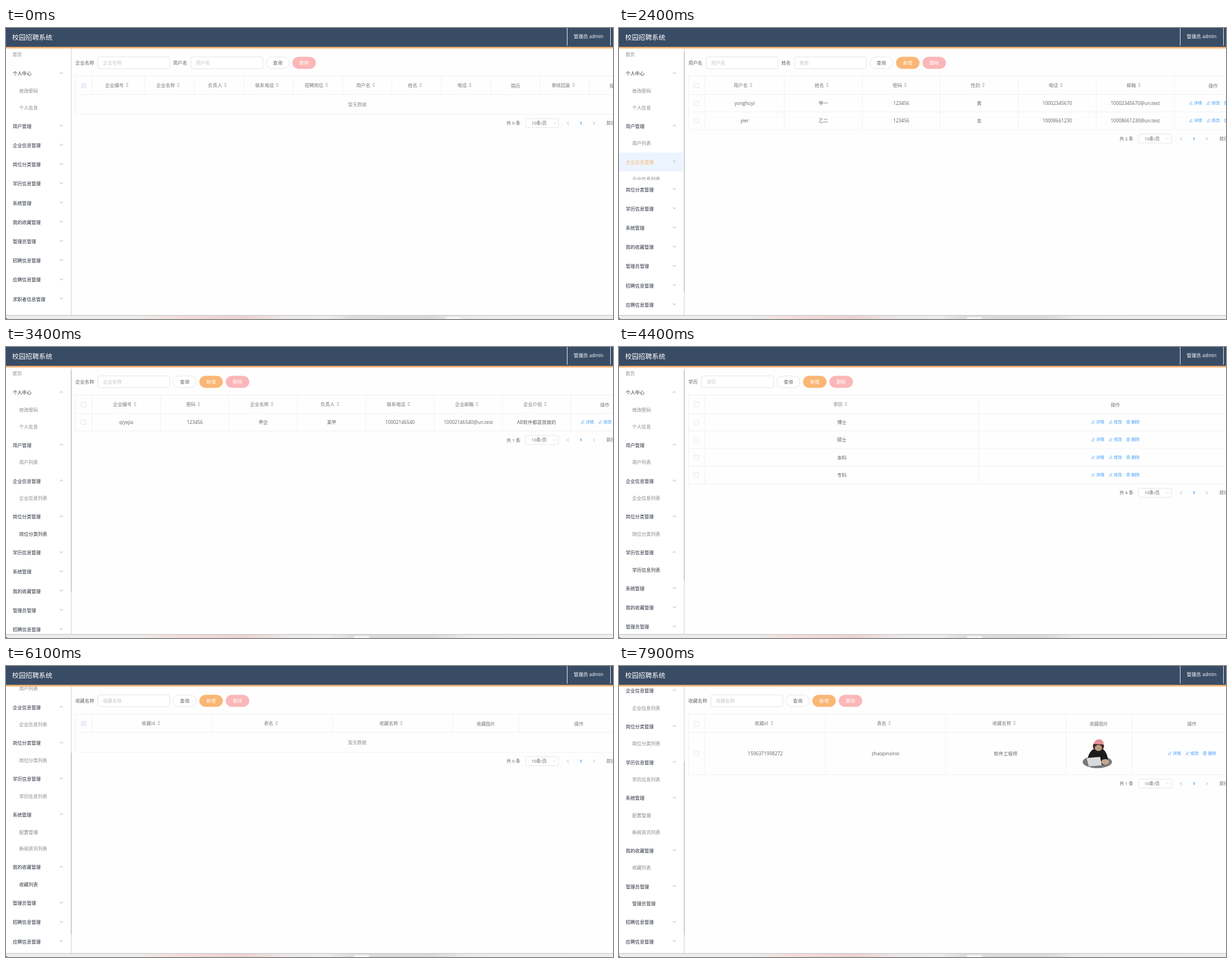
Write an HTML page that moves like this. It is 1080 by 518 pixels and loops after 8000 ms.

```html
<!DOCTYPE html>
<html lang="zh-CN">
<head>
<meta charset="utf-8">
<title>校园招聘系统</title>
<style>
html, body { margin: 0; width: 100%; height: 100%; overflow: hidden; background: #fff; }
svg { display: block; }
text { font-family: "Open Sans", "Noto Sans CJK SC", "Noto Sans CJK", sans-serif; white-space: pre; }
</style>
</head>
<body>
<svg id="stage" width="1080" height="518" viewBox="0 0 1080 518">
  <defs>
    <linearGradient id="strip">
      <stop offset="0" stop-color="#ececec"/>
      <stop offset=".22" stop-color="#ececea"/>
      <stop offset=".28" stop-color="#f3dedb"/>
      <stop offset=".39" stop-color="#ecd3d0"/>
      <stop offset=".46" stop-color="#ebe9e8"/>
      <stop offset=".53" stop-color="#ececec"/>
      <stop offset=".57" stop-color="#dcdcdc"/>
      <stop offset=".7" stop-color="#d9d9d9"/>
      <stop offset=".76" stop-color="#ebebeb"/>
      <stop offset="1" stop-color="#eeeeee"/>
    </linearGradient>
  </defs>
  <rect width="1080" height="518" fill="#fefefe"/>
  <g id="page"></g>
  <g id="menu"></g>
  <g id="frame"></g>
</svg>
<script>
const LOOP = 8000, STEP = 100, FONT = 8.3;
const LINE = '#ebeef5', EDGE = '#dcdfe6', PALE = '#c0c4cc', BLUE = '#409eff';
const ORANGE = '#fab674', PINK = '#fbb6b8';

// Drawing helpers: text is placed by its visual middle
const text = (x, y, s, fill = '#606266', anchor = 'start', size = FONT, weight = 400) =>
  `<text x="${x}" y="${(y + size * .37).toFixed(2)}" fill="${fill}" text-anchor="${anchor}" font-size="${size}" font-weight="${weight}">${s}</text>`;
const rect = (x, y, w, h, fill, stroke = 'none', r = 0) =>
  `<rect x="${x}" y="${y}" width="${w}" height="${h}" rx="${r}" fill="${fill}" stroke="${stroke}" stroke-width=".8"/>`;
const path = (d, stroke = 'none', fill = 'none', move = '', width = .8) =>
  `<path d="${d}" stroke="${stroke}" fill="${fill}" stroke-width="${width}" transform="${move}"/>`;
const hline = y => rect(123.5, y - .4, 1000, .8, LINE);
const vline = (x, y, h) => rect(x - .4, y, .8, h, LINE);
const chevron = (x, y, turn = 0, color = '#909399', k = 2.5) =>
  path(`M${-k} ${-k / 2}L0 ${k / 2}L${k} ${-k / 2}`, color, 'none', `translate(${x} ${y}) rotate(${turn})`);
const box = (y, fill = '#fff') => rect(134, y - 4, 8, 8, fill, EDGE, 1);

const person = '1000', mail = '@un.test';
const phones = [person + '2345670', person + '8661230', person + '2146540'];
const stamp = i => 1596287010430 + i * 1037;

// Pages: search labels, inner column edges, headings (* = not sortable), rows
const pages = {
  apply: {
    form: ['企业名称', '用户名'],
    edges: [247, 335, 423, 511, 599, 686.5, 774.5, 862.5, 950.5, 1038],
    heads: ['企业编号', '企业名称', '负责人', '联系电话', '招聘岗位', '用户名', '姓名', '电话', '简历*', '审核回复'],
    rows: [], fixed: true
  },
  user: {
    form: ['用户名', '姓名'],
    edges: [294, 433, 571.5, 710.5, 849, 988],
    heads: ['用户名', '姓名', '密码', '性别', '电话', '邮箱'],
    rows: [
      ['yonghuyi', '甲一', '123456', '男', phones[0], phones[0] + mail],
      ['yier', '乙二', '123456', '女', phones[1], phones[1] + mail]
    ]
  },
  firm: {
    form: ['企业名称'],
    edges: [275, 397, 518.5, 640, 762, 883, 1005],
    heads: ['企业编号', '密码', '企业名称', '负责人', '联系电话', '企业邮箱', '企业介绍'],
    rows: [['qiyejia', '123456', '甲企', '某甲', phones[2], phones[2] + mail, 'AB软件都是我做的']]
  },
  job: {
    form: ['岗位名称'], edges: [640], heads: ['岗位名称'],
    rows: [['软件开发'], ['产品设计'], ['市场运营']]
  },
  degree: {
    form: ['学历'], edges: [640], heads: ['学历'],
    rows: [['博士'], ['硕士'], ['本科'], ['专科']]
  },
  config: {
    form: [], top: 45.5, right: 1190,
    edges: [428, 733, 1035], heads: ['ID', '名称', '值'],
    rows: [1, 2, 3, 4, 5, 6].map(i =>
      [i, i < 6 ? 'picture' + i : 'homepage', `http://files.test/campus/upload/${stamp(i)}.jpg`])
  },
  saved: {
    form: ['收藏名称'],
    edges: [367.5, 581, 795, 912.5],
    heads: ['收藏id', '表名', '收藏名称', '收藏图片*'],
    rows: [['1596371998272', 'zhaopinxinxi', '软件工程师', null]], rowH: 75
  }
};

// When each page shows; "empty" is the moment before its data arrive
const visits = [
  [0, 'apply'], [1900, 'user', 'empty'], [2000, 'user'], [2800, 'firm', 'empty'], [2900, 'firm'],
  [3600, 'job', 'empty'], [3700, 'job'], [4400, 'degree'], [5500, 'config', 'empty'],
  [5600, 'config'], [6100, 'saved', 'empty'], [6200, 'saved']
];

// Menu: title, time it starts to open, entries
const items = [
  ['首页'],
  ['个人中心', -1000, '修改密码', '个人信息'],
  ['用户管理', 1250, '用户列表'],
  ['企业信息管理', 2250, '企业信息列表'],
  ['岗位分类管理', 3000, '岗位分类列表'],
  ['学历信息管理', 3850, '学历信息列表'],
  ['系统管理', 4950, '配置管理', '新闻资讯列表'],
  ['我的收藏管理', 5750, '收藏列表'],
  ['管理员管理', 7600, '管理员管理'],
  ['招聘信息管理', LOOP], ['应聘信息管理', LOOP], ['求职者信息管理', LOOP]
];

// Pointer: time, item or item.entry, lit background
const hovers = [
  [0, ''], [300, '1.0'], [700, ''], [800, '1.1'], [1000, ''], [1200, '2'], [1500, ''], [1600, '2.0'],
  [2100, '3'], [2300, '3', 1], [2600, ''], [2700, '3.0'], [3000, '4', 1], [3300, '4.0'],
  [3800, '5', 1], [4000, '5'], [4200, '5.0'], [4500, ''], [4900, '6', 1], [5200, ''], [5300, '6.0'],
  [5800, '7'], [6000, '7.0'], [6400, '10', 1], [6600, ''], [6900, '7.0'], [7100, ''],
  [7500, '8', 1], [7700, '8'], [7900, '8.0']
];

// Menu scrolling: start, end, distance
const scrolls = [[4450, 4800, 106], [5600, 5850, 59], [7050, 7350, 29.6]];

const latest = (list, t) => list.filter(e => e[0] <= t).pop();
const ease = (t, from, to) => {
  const p = Math.min(1, Math.max(0, (t - from) / (to - from)));
  return p * p * (3 - 2 * p);
};

function searchForm(labels, noAdd) {
  let x = 123.5, out = '';
  for (const s of labels) {
    out += text(x, 62, s);
    x += s.length * FONT + 6.8;
    out += rect(x, 51.5, 128, 21, '#fff', EDGE, 2.4) + text(x + 9, 62, s, PALE);
    x += 133.8;
  }
  const buttons = [['查询', '#fff', '#606266', EDGE], ['新增', ORANGE, '#fff'], ['删除', PINK, '#fff']];
  for (const [s, fill, ink, edge] of buttons) {
    if (noAdd && s === '新增') continue;
    out += rect(x, 51.7, 41.2, 20.6, fill, edge || fill, 10.3) + text(x + 20.6, 62, s, ink, 'middle', FONT, 500);
    x += 47;
  }
  return out;
}

function heading(cx, top, label) {
  const s = label.replace('*', '');
  if (s !== label) return text(cx, top + 17, s, '#74777d', 'middle', FONT, 500);
  const w = [...s].reduce((sum, c) => sum + (c < '~' ? 4.6 : FONT), 0);
  return text(cx - 7, top + 16, s, '#74777d', 'middle', FONT, 500) +
    path('M-2.8 -1L0 -4L2.8 -1ZM-2.8 1L0 4L2.8 1Z', 'none', PALE, `translate(${cx - 1 + w / 2} ${top + 16})`);
}

function actions(cx, y) {
  const pen = 'M1 2.8L1.5 .8L4.4 -2.6L5.8 -1.4L3 2L1 2.8M3.8 3H6.4';
  const bin = 'M.4 -2H6M2.2 -2V-3H4.2V-2M1.1 -2V3H5.3V-2M2.5 -.6V1.6M3.9 -.6V1.6';
  return ['详情', '修改', '删除'].map((s, i) => {
    const x = cx - 43 + i * 31.4;
    return path(i < 2 ? pen : bin, BLUE, 'none', `translate(${x} ${y})`, .65) + text(x + 9, y, s, BLUE, 'start', 7.3);
  }).join('');
}

const picture = y =>
  `<g transform="translate(851 ${y})">
    <ellipse cy="15" rx="26" ry="11" fill="#77777a"/>
    <path d="M-17 8Q-13 -7 -3 -9H9Q18 -2 19 12L12 20H-10Z" fill="#1d1b1d"/>
    <ellipse cx="2" cy="-13" rx="10" ry="8" fill="#3a2a24"/>
    <ellipse cx="2" cy="-10" rx="6.5" ry="5.5" fill="#b99a83"/>
    <path d="M-7 -17Q-3 -27 6 -25Q12 -22 11 -16Z" fill="#e58f97"/>
    <path d="M-19 8L5 6L8 21L-15 23Z" fill="#d9dadc"/>
    <ellipse cx="14" cy="15" rx="7" ry="5" fill="#c3a68c"/>
  </g>`;

function pager(y, count) {
  return text(915, y, `共 ${count} 条`, '#606266', 'end', 7.9) +
    rect(924.5, y - 8, 58.5, 16, '#fff', EDGE, 1.8) +
    text(948.5, y, '10条/页', '#606266', 'middle', 7.7) + chevron(976, y, 0, PALE, 2) +
    chevron(1000, y, 90, '#909399') + text(1023, y, '1', BLUE, 'middle', 7.7, 700) +
    chevron(1046, y, -90, '#909399') + text(1068.5, y, '前往', '#606266', 'start', 7.7);
}

function drawPage(name, empty) {
  const p = pages[name], rows = empty ? [] : p.rows;
  const top = p.top || 85.5, rowH = p.rowH || 31.3, first = top + 32.8;
  const cols = [153, ...p.edges, p.right || 1126];
  const mid = i => (cols[i] + cols[i + 1]) / 2;
  const bottom = first + (rows.length * rowH || 35.2);
  let out = p.form.length ? searchForm(p.form, p.fixed) : '';
  out += hline(top) + hline(first) + vline(123.5, top, bottom - top) + box(top + 17, rows.length ? '#fff' : '#edf2fc');
  cols.slice(0, -1).forEach(x => out += vline(x, top, (rows.length ? bottom : first) - top));
  p.heads.forEach((s, i) => out += heading(mid(i), top, s));
  const last = p.heads.length;
  out += heading(mid(last), top, '操作*');
  rows.forEach((row, r) => {
    const y = first + rowH * (r + .5);
    out += rect(133.5, y - 4, 8, 8, '#fff', EDGE, 1) + hline(first + rowH * (r + 1));
    row.forEach((s, i) => out += s === null ? picture(y) : text(mid(i), y, s, '#606266', 'middle', 8.4));
    out += actions(mid(last), y - .5);
  });
  if (!rows.length) out += hline(bottom) + text(625, first + 17.6, '暂无数据', '#909399', 'middle');
  return out + pager(bottom + 16, rows.length);
}

function drawMenu(t) {
  const HEAD = 34.2, SUB = 29.6, VIEW = 475;
  const [, over, lit] = latest(hovers, t);
  const scroll = scrolls.reduce((sum, [a, b, d]) => sum + d * ease(t, a, b), 0);
  let y = -6 - scroll, full = 463 - 2 * SUB, out = '';
  items.forEach(([title, at, ...subs], i) => {
    const hot = over === String(i), cy = y + HEAD / 2;
    const open = ease(t, at, at + 300);
    if (hot && lit) out += rect(0, cy - 16.8, 114, 33.6, '#ecf5ff');
    out += i ? text(12, cy, title, hot ? ORANGE : '#252c3a', 'start', FONT, 500)
             : text(11.5, cy, title, '#8a8c91');
    if (i) out += chevron(98.5, cy - 1, 180 * open, '#85888e');
    y += HEAD;
    const h = subs.length * SUB * open;
    if (h > 0) {
      out += `<svg x="0" y="${y}" width="114" height="${h}" overflow="hidden">` +
        subs.map((s, j) => text(23.5, SUB * (j + .5) - 1.2, s, over === `${i}.${j}` ? '#303133' : '#85878c')).join('') + '</svg>';
      y += h;
      full += h;
    }
  });
  const k = 457 / full;
  const thumb = full > VIEW ? rect(115.6, 42 + scroll * k, 1.4, VIEW * k, '#c3c3c5', 'none', .7) : '';
  return `<svg x="0" y="36" width="118" height="${VIEW}" overflow="hidden">${rect(0, 0, 115, VIEW, '#fff')}${out}</svg>` +
    rect(115, 36, 2, VIEW, '#e6e6e8') + thumb;
}

function drawFrame(t) {
  const pill = t < 1000 ? 782 : 619;
  return rect(0, 0, 1080, 34, '#394c65') + rect(0, 33.6, 1080, 2.9, ORANGE) +
    text(11, 16.3, '校园招聘系统', '#fff', 'start', 11.9) +
    text(1010, 15, '管理员 admin', '#fff', 'start', 8.5) +
    rect(998, 0, 1, 31.5, '#e8ebef') + rect(1075, 0, 1, 31.5, '#e8ebef') +
    rect(0, 511, 1080, 7, 'url(#strip)') + rect(0, 511, 1080, 1, '#bfc2c6') +
    path('M0 515Q1 518 4 518H0Z', 'none', '#555') + rect(pill, 514.5, 27, 6, '#f7f7f7', 'none', 2);
}

const shown = {};
function put(id, html) {
  if (shown[id] === html) return;
  shown[id] = html;
  document.getElementById(id).innerHTML = html;
}

function render(t) {
  const [, name, empty] = latest(visits, t);
  put('page', drawPage(name, empty));
  put('menu', drawMenu(t));
  put('frame', drawFrame(t));
}

const start = performance.now();
function tick() {
  const t = (performance.now() - start) % LOOP;
  render(Math.floor(t / STEP) * STEP);
  requestAnimationFrame(tick);
}
tick();
</script>
</body>
</html>
```
